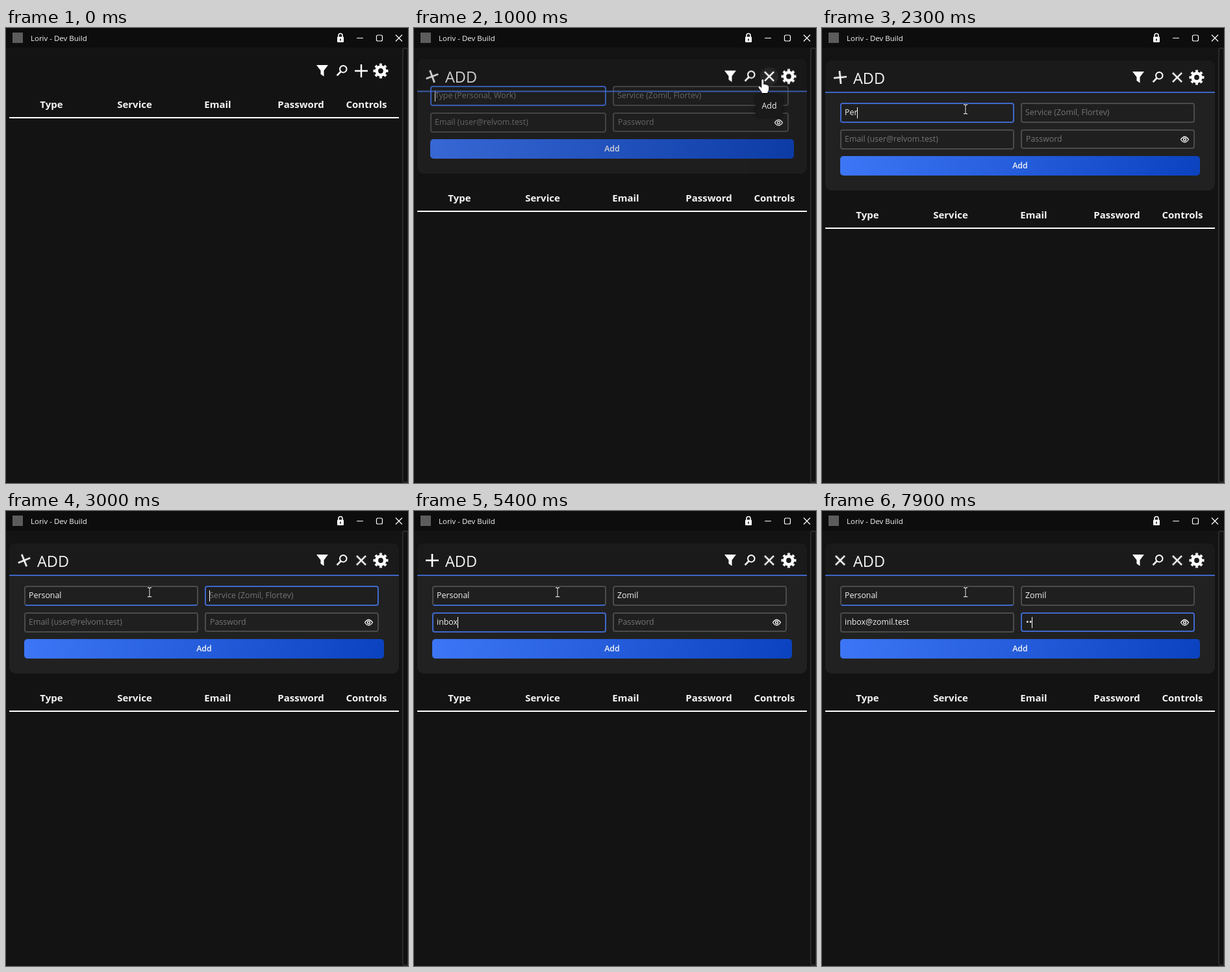
Recreate the animation shown at these times as an HTML page. Size 619 px wide and 700 px high, loop 8000 ms.

```html
<!DOCTYPE html>
<html lang="en">
<head>
<meta charset="utf-8">
<title>Loriv - Dev Build</title>
<style>
  :root { --blue: #4069cc; --grey: #4b4b4b; }
  * { box-sizing: border-box; }
  html, body { margin: 0; width: 100%; height: 100%; overflow: hidden; background: #131313; }
  body { font: 12.4px/1 "Open Sans", "Noto Sans", sans-serif; color: #f4f4f4; }
  #stage { position: relative; width: 619px; height: 700px; overflow: hidden; }
  #stage > * { position: absolute; }
  svg { display: block; overflow: visible; fill: none; stroke: #fff; }

  .titlebar { left: 0; top: 0; width: 619px; height: 30px; background: #0d0d0d; }
  .titlebar span { position: absolute; left: 38px; top: 0; font-size: 11.5px; line-height: 31px; white-space: pre; }
  .titlebar svg { position: absolute; left: 0; top: 0; }
  .scrollbar { left: 610px; top: 30px; width: 10px; height: 670px; border: 2px solid #2a2a2a; border-radius: 4px; background: #101010; }

  .panel { left: 5px; top: 50px; width: 600px; height: 200px; border-radius: 10px; overflow: hidden; background: #212121;
           animation: grow 8s infinite, fade 8s infinite; }
  .panel::before { content: ""; display: block; height: 48px; background: #1a1a1a; }
  .rule { left: 5px; top: 98px; width: 600px; height: 2px; background: #3f66c6; }
  .heading { left: 48px; top: 65px; font-size: 23.5px; line-height: 24px; }
  .mark { left: 28px; top: 76px; }
  .upper { --from: -10px; animation: drop 8s infinite; }
  .upper.fading { animation: drop 8s infinite, fade 8s infinite; }
  .lower { --from: -170px; animation: drop 8s infinite; }
  .swing { animation: swing 8s infinite; }
  .cross { animation: cross 8s infinite; }
  .halo { fill: #262626; stroke: none; animation: tip 8s infinite; }

  .form { left: 28px; top: 115px; width: 554px; animation: drop 8s infinite, spread 8s infinite, fade 8s infinite; }
  .grid { display: grid; grid-template-columns: 1fr 1fr; gap: 10px; padding-right: 8px; }
  .field { position: relative; display: flex; align-items: center; height: 31px; padding-left: 5px; white-space: pre;
           background: #1f1f1f; border: 2px solid; border-color: var(--edge, var(--grey)); border-radius: 4px; }
  .field:first-child { border-bottom-color: var(--blue); }
  .field:last-child { height: 30px; padding-left: 6px; }
  .field i { width: 1px; height: 17px; margin-right: -1px; background: #fff; }
  .hint { color: #757575; }
  .field svg { position: absolute; right: 7px; top: 8px; }
  .button { height: 30px; margin-top: 10px; border-radius: 5px; text-align: center; font-weight: 600; line-height: 30px;
            background: linear-gradient(100deg, #3d76f6, #0b42bf); }

  .table { left: 5px; top: 266px; width: 600px; height: 43px; border-bottom: 2px solid #fff; font-size: 15px; font-weight: 700; }
  .table span { position: absolute; top: 0; width: 120px; margin-left: -65px; line-height: 43px; text-align: center; }

  .tip { left: 526px; top: 103px; width: 42px; height: 34px; border-radius: 6px; background: #191919; box-shadow: 0 0 5px #0009;
         line-height: 34px; text-align: center; animation: tip 8s infinite; }
  .cursor { left: 0; top: 0; animation: travel 8s infinite; }
  .cursor g { fill: #fff; stroke: #000; stroke-width: 1; opacity: 0; animation: 8s step-end infinite; }
  .cursor .arrow { animation-name: arrow; }
  .cursor .hand { animation-name: hand; }
  .cursor .beam { animation-name: beam; }

  @keyframes drop {
    0%, 8.75% { transform: translateY(var(--from)); animation-timing-function: ease; }
    15.6%, 100% { transform: none; }
  }
  @keyframes fade {
    0%, 8.75% { opacity: 0; animation-timing-function: ease; }
    15.6%, 100% { opacity: 1; }
  }
  @keyframes grow {
    0%, 8.75% { top: 40px; height: 40px; animation-timing-function: ease; }
    15.6%, 100% { top: 50px; height: 200px; }
  }
  @keyframes spread {
    0%, 8.75% { left: 8px; width: 594px; animation-timing-function: ease; }
    15.6%, 100% { left: 28px; width: 554px; }
  }
  @keyframes cross {
    0%, 8.75% { transform: none; animation-timing-function: ease; }
    12%, 100% { transform: rotate(45deg); }
  }
  @keyframes swing {
    0%, 6.9%, 26.9%, 40.6%, 54.4%, 67.5%, 77.5%, 89.4% { transform: none; animation-timing-function: ease-in-out; }
    18.75%, 34.4%, 48.1%, 61.2%, 72.5%, 83.1%, 98.75%, 100% { transform: rotate(-45deg); animation-timing-function: ease-in-out; }
  }
  @keyframes tip {
    0%, 7.5% { opacity: 0; }
    10%, 14% { opacity: 1; }
    16%, 100% { opacity: 0; }
  }
  @keyframes travel {
    0%, 4% { transform: translate(622px, 140px); animation-timing-function: ease-out; }
    8%, 13.5% { transform: translate(537px, 79px); animation-timing-function: ease-in-out; }
    18.5%, 100% { transform: translate(221px, 125px); }
  }
  @keyframes arrow { 0% { opacity: 0; } 4% { opacity: 1; } 7.2% { opacity: 0; } 14.2% { opacity: 1; } 16.5%, 100% { opacity: 0; } }
  @keyframes hand { 0% { opacity: 0; } 7.2% { opacity: 1; } 14.2%, 100% { opacity: 0; } }
  @keyframes beam { 0% { opacity: 0; } 16.5%, 100% { opacity: 1; } }
</style>
</head>
<body>
<div id="stage">
  <div class="titlebar">
    <span>Loriv - Dev Build</span>
    <svg width="619" height="30">
      <rect x="10" y="7" width="16" height="16" fill="#5c5c5c" stroke="none"/>
      <path d="M512 14v-2.5a3 3 0 0 1 6 0V14" stroke-width="1.6"/>
      <rect x="510" y="13.5" width="10" height="8.5" rx="1" fill="#fff" stroke="none"/>
      <path d="M515 16.5v3" stroke="#0d0d0d" stroke-width="1.6"/>
      <path d="M540 15.5h10M600 10.5l10 10m0-10l-10 10" stroke-width="1.2"/>
      <rect x="570.5" y="11" width="9" height="9" rx="2" stroke-width="1.2"/>
    </svg>
  </div>
  <div class="scrollbar"></div>

  <div class="panel"></div>
  <div class="form lower">
    <div class="grid" id="fields"></div>
    <div class="button">Add</div>
  </div>
  <div class="rule upper fading"></div>
  <div class="heading upper fading">ADD</div>
  <svg class="mark upper fading" width="1" height="1">
    <path class="swing" d="M-10 0H10M0-10V10" stroke-width="2.6"/>
  </svg>

  <svg class="upper" width="619" height="110" style="left:0;top:0">
    <path d="M478 67h18l-6.5 8.5v9l-5-3.5v-5.5z" fill="#fff" stroke="none"/>
    <circle cx="519.3" cy="73.2" r="5.2" stroke-width="2"/>
    <path d="M515.6 77l-6 6.2" stroke-width="2.6"/>
    <g transform="translate(547 76)">
      <circle class="halo" r="14"/>
      <path class="cross" d="M-10 0H10M0-10V10" stroke-width="2.4"/>
    </g>
    <g transform="translate(577 76)">
      <circle r="6.3" stroke-width="4.8"/>
      <circle r="9.7" stroke-width="3.6" pathLength="16" stroke-dasharray="1 1" stroke-dashoffset=".5"/>
    </g>
  </svg>

  <div class="table lower">
    <span style="left:70px">Type</span>
    <span style="left:198px">Service</span>
    <span style="left:326px">Email</span>
    <span style="left:454px">Password</span>
    <span style="left:555px">Controls</span>
  </div>

  <div class="tip upper-tip">Add</div>
  <svg class="cursor" width="1" height="1">
    <g class="arrow"><path d="M0 0v16l3.8-3.6 2.6 6 2.5-1.1-2.6-5.9h5.2z"/></g>
    <g class="hand"><path d="M-2.2 1.5a2 2 0 0 1 4 0V7.5q2-1 3 .6q2-.7 2.8 .9q2.2-.4 2.2 2V15q0 2.5-1.8 4.5V21.500H-2V19.500L-6.800 13q-1.200-2.200 .7-3q1.500-.4 3.900 2.400z"/></g>
    <g class="beam"><path d="M-3.500-8h2.500l1 .8 1-.8h2.500v2h-2.600V6h2.600v2H1l-1-.8-1 .8h-2.500V6h2.600V-6h-2.600z" stroke-width=".7"/></g>
  </svg>
</div>

<script>
const LOOP = 8000, FADE = 200;

// bursts: [first key, last key, number of keys]
const fields = [
  { hint: 'Type (Personal, Work)', text: 'Personal', focus: 750, bursts: [[2050, 2700, 8]] },
  { hint: 'Service (Zomil, Flortev)', text: 'Zomil', focus: 2800, bursts: [[3300, 4100, 5]] },
  { hint: 'Email (user@relvom.test)', text: 'inbox@zomil.test', focus: 4300,
    bursts: [[4750, 5350, 5], [5600, 6350, 6], [6450, 6750, 5]] },
  { hint: 'Password', text: '••', focus: 6800, bursts: [[7600, 7850, 2]] },
];

const eye = `<svg width="13" height="11" stroke-width="1.3">
  <path d="M.5 5.500Q6.500-3 12.500 5.500Q6.500 14 .5 5.500z"/><circle cx="6.500" cy="5.500" r="2"/></svg>`;

const clamp = (v, lo, hi) => Math.min(hi, Math.max(lo, v));
const ramp = (t, start) => clamp((t - start) / FADE, 0, 1);

const grid = document.getElementById('fields');
fields.forEach((field, i) => {
  const box = document.createElement('div');
  box.className = 'field';
  box.innerHTML = `<span></span><i></i><span class="hint">${field.hint}</span>${i === 3 ? eye : ''}`;
  grid.append(box);
  const [typed, caret, hint] = box.children;
  Object.assign(field, { box, typed, caret, hint, blur: fields[i + 1]?.focus ?? LOOP });
});

function keysPressed({ bursts, focus }, t) {
  let count = 0, last = focus;
  for (const [first, end, keys] of bursts) {
    if (t < first) break;
    const step = (end - first) / (keys - 1);
    const done = clamp(Math.floor((t - first) / step) + 1, 0, keys);
    count += done;
    last = first + (done - 1) * step;
  }
  return { count, last };
}

function render(t) {
  for (const f of fields) {
    const { count, last } = keysPressed(f, t);
    const focused = t >= f.focus && t < f.blur;
    const glow = ramp(t, f.focus) - ramp(t, f.blur);
    f.typed.textContent = f.text.slice(0, count);
    f.hint.style.display = count ? 'none' : '';
    f.caret.style.opacity = focused && (t - last) % 1000 < 500 ? 1 : 0;
    f.box.style.setProperty('--edge', `color-mix(in srgb, var(--blue) ${glow * 100}%, var(--grey))`);
  }
}

const start = performance.now();
function tick() {
  render((performance.now() - start) % LOOP);
  requestAnimationFrame(tick);
}
tick();
</script>
</body>
</html>
```
